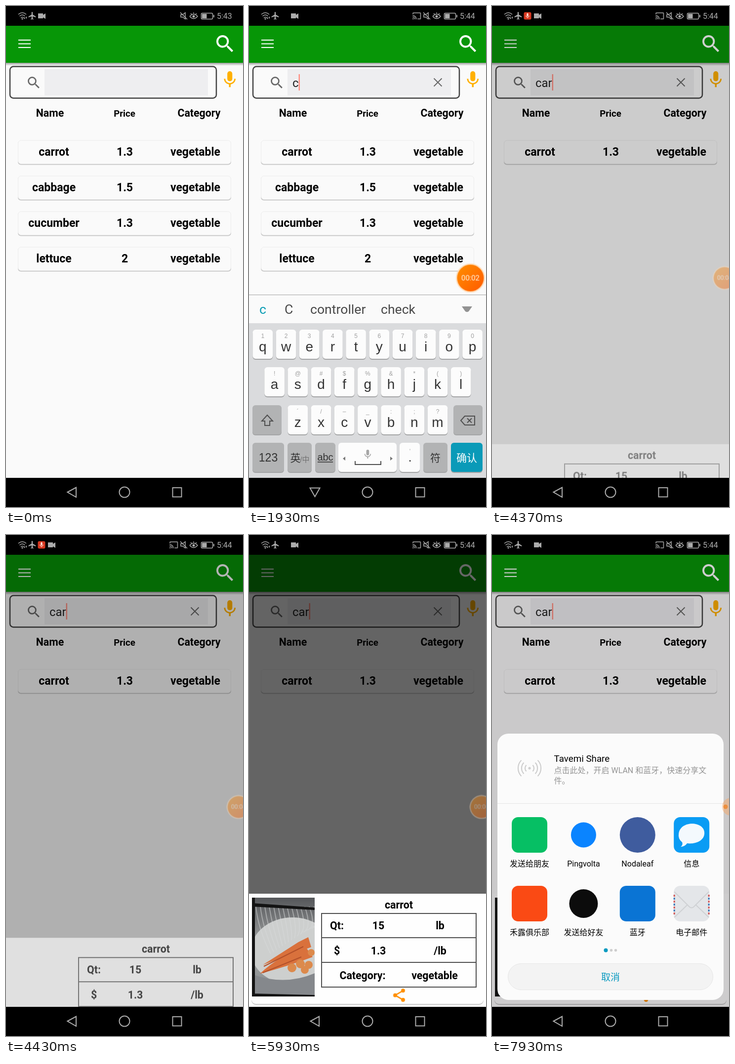
These frames come from a looping animation (480 px wide and 1014 px high, 8 s). An HTML page:

```html
<!DOCTYPE html>
<html lang="en">
<head>
<meta charset="utf-8">
<title>Grocery search</title>
<style>
html, body { margin: 0; width: 100%; height: 100%; overflow: hidden; background: #000; }
svg { display: block; width: 480px; height: 1014px; }
text { font-family: Roboto, 'Noto Sans CJK SC', 'Noto Sans CJK', sans-serif; }
.mid { text-anchor: middle; }
.bold { font-weight: 700; }
.line { fill: none; stroke-width: 2; }
.key { font-family: 'Liberation Sans', 'Noto Sans CJK SC', 'Noto Sans CJK', sans-serif; fill: #333; }
.hint { font-size: 12px; fill: #a0a0a0; }
.status { fill: #acacac; stroke: #acacac; stroke-width: 0; }
.status .line { fill: none; stroke-width: 1.5; }
.veil { mix-blend-mode: multiply; fill: #fff; }

#keyboard, #sheet, #photo, #share, #bubble, #under, #over { animation: 8s linear infinite; }
#keyboard { animation-name: keyboard; }
#sheet { animation-name: sheet; }
#photo { animation-name: photo; }
#share { animation-name: share; }
#bubble { animation-name: bubble; }
#under { animation-name: under; }
#over { animation-name: over; }

@keyframes keyboard {
  0%, 2.5% { transform: translateY(371px); animation-timing-function: cubic-bezier(.2, .6, .3, 1); }
  8.5%, 53.37% { transform: none; }
  53.375%, 100% { transform: translateY(371px); }
}
@keyframes sheet {
  0%, 54% { transform: translateY(229px); opacity: 0; }
  54.125% { transform: translateY(210px); opacity: .2; }
  55.375% { transform: translateY(90px); opacity: .62; animation-timing-function: ease-out; }
  57.875%, 100% { transform: none; opacity: 1; }
}
@keyframes photo {
  0%, 59.6% { opacity: 0; }
  62.9%, 100% { opacity: 1; }
}
@keyframes share {
  0%, 94.62% { transform: translateY(560px); }
  94.625% { transform: translateY(126px); animation-timing-function: cubic-bezier(.2, .6, .3, 1); }
  99.125%, 100% { transform: none; }
}
@keyframes bubble {
  0%, 31.6% { transform: translate(448.5px, 550.5px); opacity: 1; }
  33.75%, 100% { transform: translate(471px, 550.5px) scale(.82); opacity: .4; }
}
@keyframes under {
  0%, 53.375% { fill: #fff; }
  55.375% { fill: #b4b4b4; }
  57.875%, 94.62% { fill: #666; }
  94.625%, 100% { fill: #fff; }
}
@keyframes over {
  0%, 94.62% { fill: #fff; }
  94.625% { fill: #828284; }
  99.125%, 100% { fill: #cecdce; }
}
</style>
</head>
<body>
<svg viewBox="0 0 480 1014">
  <defs>
    <path id="lens" d="M15.5 14h-.79l-.28-.27A6.47 6.47 0 0 0 16 9.5 6.5 6.5 0 1 0 9.5 16c1.61 0 3.09-.59 4.23-1.57l.27.28v.79l5 4.99L20.49 19zm-6 0a4.5 4.5 0 1 1 0-9 4.5 4.5 0 0 1 0 9z"/>
    <path id="mic" d="M12 14a3 3 0 0 0 3-3V5a3 3 0 0 0-6 0v6a3 3 0 0 0 3 3zm5.3-3c0 3-2.54 5.1-5.3 5.1S6.7 14 6.7 11H5c0 3.41 2.72 6.23 6 6.72V21h2v-3.28c3.28-.48 6-3.3 6-6.72z"/>
    <linearGradient id="fade" x2="0" y2="1">
      <stop stop-color="#555"/><stop offset="1" stop-color="#555" stop-opacity="0"/>
    </linearGradient>
    <linearGradient id="wall" x2="0" y2="1">
      <stop stop-color="#55575a"/><stop offset=".5" stop-color="#a4a6a6"/><stop offset="1" stop-color="#85898c"/>
    </linearGradient>
    <linearGradient id="glow" x2="1" y2="1">
      <stop stop-color="#ff9000"/><stop offset="1" stop-color="#ff5a00"/>
    </linearGradient>
    <clipPath id="frame"><rect x="6" y="734" width="127" height="200"/></clipPath>
  </defs>

  <rect width="480" height="1014" fill="#fafafa"/>

  <!-- app bar and search box -->
  <rect y="115" width="480" height="6" fill="url(#fade)" opacity=".55"/>
  <rect y="40" width="480" height="75" fill="#079607"/>
  <path class="line" d="M25 69h25M25 76.5h25M25 84h25" stroke="#fff"/>
  <use href="#lens" transform="translate(420.2 53.2) scale(1.95)" fill="#fff"/>
  <rect x="8" y="122.5" width="418" height="64" rx="7" fill="#fafafa" stroke="#444" stroke-width="2.5"/>
  <rect x="78" y="128" width="331" height="53" fill="#eeeef0"/>
  <use href="#lens" transform="translate(40 139) scale(1.36)" fill="#686868"/>
  <use href="#mic" transform="translate(433 128.7) scale(1.69)" fill="#ffb000"/>
  <g id="field"></g>
  <path class="line" data-on="1370-8000" d="M374.5 146.5l16 16m0-16l-16 16" stroke="#686868"/>
  <g id="list"></g>

  <g id="keyboard">
    <rect y="584" width="480" height="371" fill="#fafafa"/>
    <rect y="584" width="480" height="1.2" fill="#b0b0b0"/>
    <rect y="642" width="480" height="313" fill="#dadbdd"/>
    <path d="M431 608h21l-7 10q-3.5 2.5-7 0z" fill="#929292"/>
    <g id="words"></g>
    <g id="keys"></g>
    <g class="line" stroke="#505050">
      <path d="M37 828l-11 12h6v9h10v-9h6z"/>
      <path d="M429 839l8-9h20v18h-20zM442 834.5l9 9m0-9l-9 9"/>
      <path d="M139 923h31M215 921v7h52v-7"/>
    </g>
    <path d="M195 912v8l-5-4zM286 912v8l5-4z" fill="#777"/>
    <use href="#mic" transform="translate(229 896) scale(.95)" fill="#a5a5a5"/>
  </g>

  <rect id="under" class="veil" y="40" width="480" height="915"/>

  <g id="sheet">
    <rect y="726" width="480" height="229" fill="#fefefe"/>
    <rect x="5" y="736" width="470" height="215" rx="9" fill="#cbcbcb"/>
    <rect x="5" y="734" width="470" height="215" rx="9" fill="#fefefe"/>
    <g id="photo" clip-path="url(#frame)">
      <rect x="6" y="734" width="127" height="200" fill="url(#wall)"/>
      <ellipse cx="88" cy="842" rx="84" ry="68" fill="#cdcfce"/>
      <g id="stripes" class="line" stroke="#d8dada" opacity=".5"></g>
      <path d="M6 889q66 24 127-2v47H6z" fill="#85888c"/>
      <path d="M22 888q40-38 93-54l14 20q-48 18-107 34zM28 870l72-46 20-10 6 20z" fill="#d9713c"/>
      <path d="M30 873l80-40M28 886l78-32" class="line" stroke="#b2502a"/>
      <g fill="#dc8a4c">
        <circle cx="87" cy="876" r="9"/><circle cx="104" cy="868" r="9"/><circle cx="121" cy="870" r="8"/>
        <circle cx="113" cy="880" r="8"/><circle cx="126" cy="845" r="7"/>
      </g>
      <path d="M6 745l127 9v5L6 752zM6 734h6v200H6zM6 928l127 3v3H6z" fill="#131313"/>
    </g>
    <path class="line" d="M147 766h313v149H147zM147 815h313M147 865h313" stroke="#505050"/>
    <g id="facts"></g>
    <g fill="#ff8f00" stroke="#ff8f00" transform="translate(288 915.5) scale(1.33)">
      <path class="line" d="M18 5L6 12l12 7"/>
      <circle cx="18" cy="5" r="2.5"/><circle cx="6" cy="12" r="2.5"/><circle cx="18" cy="19" r="2.5"/>
    </g>
  </g>

  <rect id="over" class="veil" y="40" width="480" height="915"/>

  <g id="share">
    <rect x="11" y="402" width="458" height="539" rx="22" fill="#fbfbfb"/>
    <rect x="11" y="543" width="458" height="1" fill="#e4e4e4"/>
    <rect x="32.5" y="867.5" width="415" height="53" rx="26.5" fill="#f3f3f3" stroke="#e6e6e6"/>
    <g id="waves" class="line" stroke="#cbcbcb"></g>
    <g id="apps"></g>
    <circle cx="230.5" cy="840.5" r="4" fill="#0a9ac0"/>
    <circle cx="241.5" cy="840.5" r="2.7" fill="#cecece"/>
    <circle cx="250.5" cy="840.5" r="2.7" fill="#cecece"/>
  </g>

  <!-- recorder bubble -->
  <g data-on="170-7270">
    <g id="bubble">
      <circle r="29.5" fill="#ffdcb8"/>
      <circle r="27" fill="url(#glow)"/>
    </g>
  </g>
  <g data-on="7270-8000">
    <circle cx="484" cy="550" r="18" fill="#ffa050" opacity=".4"/>
    <circle cx="473" cy="550" r="4.5" fill="#f08020" opacity=".75"/>
  </g>

  <!-- status bar -->
  <rect width="480" height="40"/>
  <g class="status">
    <path class="line" d="M25 17q8-7 16 0M27.5 20.5q5.5-5 11 0M30 24q3-3 6 0"/>
    <circle cx="33" cy="26" r="1.5"/>
    <path d="M36.5 27v-5l2.5 2.5zM42 21v5l-2.5-2.5z"/>
    <path transform="translate(44 10.4) scale(.78)" d="M21 16v-2l-8-5V3.5a1.5 1.5 0 0 0-3 0V9l-8 5v2l8-2.5V19l-2 1.5V22l3.5-1 3.5 1v-1.5L13 19v-5.5z"/>
    <path data-on="0-30" d="M65 15h10v3l5-3v11l-5-3v2H65z"/>
    <path data-on="30-8000" d="M85 15h10v3l5-3v11l-5-3v2H85z"/>
    <path data-on="30-8000" transform="translate(330.5 10.8) scale(.77)" d="M21 3H3a2 2 0 0 0-2 2v3h2V5h18v14h-7v2h7a2 2 0 0 0 2-2V5a2 2 0 0 0-2-2zM1 18v3h3a3 3 0 0 0-3-3zm0-4v2a5 5 0 0 1 5 5h2a7 7 0 0 0-7-7zm0-4v2a9 9 0 0 1 9 9h2A11 11 0 0 0 1 10z"/>
    <path class="line" d="M354 17.5h4l5-4v13l-5-4h-4zM353 13l14 14"/>
    <path class="line" d="M372 21q8-9 16 0q-8 9-16 0M374 15l2 2M380 13v2M386 15l-2 2"/>
    <circle cx="380" cy="21" r="2.5"/>
    <rect class="line" x="395.5" y="14.5" width="23" height="12" rx="2"/>
    <path d="M397 16h9.5v9H397zM420 18h1.8v5H420z"/>
  </g>
  <g data-on="30-1570 3100-4630 6200-7770">
    <rect x="64.5" y="12.5" width="15" height="15" rx="3" fill="#d83820"/>
    <use href="#mic" transform="translate(65.5 13.5) scale(.54)" fill="#ffe8e0"/>
  </g>
  <g id="clock"></g>

  <!-- navigation bar -->
  <rect y="955" width="480" height="59"/>
  <g class="line" stroke="#acacac">
    <path data-on="0-30 4270-8000" d="M124.5 984l17.5-9.5v19.5z"/>
    <path data-on="30-4270" d="M123.5 975.5h20l-10 17.5z"/>
    <circle cx="240" cy="984" r="10.5"/>
    <rect x="337.5" y="975" width="18" height="18.5"/>
  </g>
</svg>

<script>
const LOOP = 8000;
const add = (id, html) => document.getElementById(id).insertAdjacentHTML('beforeend', html);
const label = (x, y, size, str, cls = 'mid', extra = '') =>
  `<text x="${x}" y="${y}" font-size="${size}" class="${cls}" ${extra}>${str}</text>`;
const on = (...spans) => `data-on="${spans.join(' ')}"`;

// Product list
add('list', label(89, 224, 21.33, 'Name', 'mid bold') + label(240, 224, 18.67, 'Price', 'mid bold')
  + label(391, 224, 21.33, 'Category', 'mid bold'));
[['carrot', '1.3', 8000], ['cabbage', '1.5', 3250], ['cucumber', '1.3', 2200], ['lettuce', '2', 2200]]
  .forEach(([name, price, end], i) => {
    const y = 272 + 72 * i;
    const cells = [[97, name], [240.5, price], [383.5, 'vegetable']];
    add('list', `<g ${on('0-' + end)}>
      <rect x="24" y="${y + 1.5}" width="432" height="48" rx="6" fill="#c6c6c6"/>
      <rect x="24.5" y="${y}" width="431" height="47.5" rx="6" fill="#fafafa" stroke="#ececec"/>
      ${cells.map(([x, s]) => label(x, y + 31, 23, s, 'mid bold')).join('')}</g>`);
  });

// Typed text, caret and suggestions
const states = [
  { word: '', caret: 88, blink: ['30-1370'], span: '30-1370', tips: [] },
  { word: 'c', caret: 100.6, blink: ['1370-2070'], span: '1370-2070',
    tips: [[21, 'c'], [72, 'C'], [124, 'controller'], [267, 'check']] },
  { word: 'ca', caret: 113.6, blink: ['2070-2530', '3100-3130'], span: '2070-3130',
    tips: [[21, 'ca'], [87, 'can'], [167, 'call'], [242, 'car']] },
  { word: 'car', caret: 121.6, blink: ['3130-3730', '4270-8000'], span: '3130-8000',
    tips: [[21, 'car'], [96, 'carry'], [189, 'care'], [271, 'card']] },
];
for (const { word, caret, blink, span, tips } of states) {
  add('field', label(88, 164, 24, word, '', `fill="#202020" ${on(span)}`)
    + `<rect x="${caret}" y="138" width="2.4" height="33" fill="#ff8c80" ${on(...blink)}/>`);
  add('words', `<g ${on(span)}>` + tips.map(([x, s], i) =>
    label(x, 622.5, 26.6, s, '', `fill="${i ? '#484848' : '#0a9cb4'}"`)).join('') + '</g>');
}

// Keyboard
const cap = (x, y, w, fill = '#fcfcfc') => `
  <rect x="${x}" y="${y + 2}" width="${w}" height="59" rx="6" fill="#a4a5a6"/>
  <rect x="${x}" y="${y}" width="${w}" height="59" rx="6" fill="${fill}"/>`;
const presses = { c: '1300-1430', a: '2000-2130', r: '3100-3230' };
[['qwertyuiop', '1234567890', 7.5, 655], ['asdfghjkl', '!@#$%&*()', 31.3, 731], ['zxcvbnm', '´/–_:;?', 78.5, 808]]
  .forEach(([letters, hints, x0, y]) => [...letters].forEach((ch, i) => {
    const x = x0 + 47.2 * i, cx = x + 20.3;
    const press = presses[ch]
      ? `<rect x="${x}" y="${y}" width="40.6" height="59" rx="6" fill="#c4c4c4" ${on(presses[ch])}/>` : '';
    add('keys', cap(x, y, 40.6) + press + label(cx, y + 17, 12, hints[i].replace('&', '&amp;'), 'mid key hint')
      + label(cx, y + 44, 28, ch, 'mid key'));
  }));
const grey = '#b2b3b4';
add('keys', cap(7, 808, 59, grey) + cap(414, 808, 59, grey) + cap(7, 884, 64, grey) + cap(78, 884, 49, grey)
  + cap(134, 884, 41, grey) + cap(181, 884, 118) + cap(305, 884, 41) + cap(353, 884, 49, grey)
  + cap(409, 884, 64, '#0a9ab8')
  + label(39, 922, 23, '123', 'mid key') + label(94, 922, 21, '英', 'mid key')
  + label(113, 923, 15, '/中', 'mid key', 'opacity=".5"') + label(154.5, 920, 20, 'abc', 'mid key')
  + label(326, 922, 26, '.', 'mid key') + label(326, 898, 14, ',', 'mid key hint')
  + label(377.5, 922, 21, '符', 'mid key')
  + label(441, 922, 21, '确认', 'mid', 'fill="#fff"'));

// Product sheet
for (let i = 0; i < 16; i++)
  add('stripes', `<path d="M${14 + i * 9} 752q${4 + i} 44 ${30 - i * 3} ${96 - i * 4}"/>`);
[[303.5, 756, 'carrot'], [178, 798, 'Qt:'], [262, 798, '15'], [387, 798, 'lb'], [178, 849, '$'],
 [262, 849, '1.3'], [387, 849, '/lb'], [230, 899, 'Category:'], [376, 899, 'vegetable']]
  .forEach(([x, y, s]) => add('facts', label(x, y, 21.33, s, 'mid bold')));

// Share panel
add('waves', '<circle cx="76" cy="472" r="1.5"/>');
for (const r of [9, 16, 23]) {
  const dx = r * .72, dy = r * .7;
  for (const s of [-1, 1])
    add('waves', `<path d="M${76 + s * dx} ${472 - dy}A${r} ${r} 0 0 ${s > 0 ? 1 : 0} ${76 + s * dx} ${472 + dy}"/>`);
}
add('apps', label(125.5, 458.5, 18.8, 'Tavemi Share', '')
  + label(125.5, 481.5, 16, '点击此处，开启 WLAN 和蓝牙，快速分享文', '', 'fill="#949494"')
  + label(125.5, 502.5, 16, '件。', '', 'fill="#949494"')
  + label(240, 901.5, 19, '取消', 'mid', 'fill="#0a9ac0"'));
const tile = fill => `<rect x="-36" y="-36" width="72" height="72" rx="13" fill="${fill}"/>`;
const disc = (r, fill) => `<circle r="${r}" fill="${fill}"/>`;
const chat = tile('#0a9cf4') + '<path d="M-19 15Q-28 8-26-3C-22-30 26-28 26-4C26 14 4 19-9 17Q-14 24-22 24Q-17 20-19 15z" fill="#f4f9fd"/>';
const mail = tile('#e4e6e9') + `<path class="line" d="M-35-24L-4 7Q0 10 4 7L35-24M-35 28L-9 3M35 28L9 3" stroke="#cfd1d4"/>
  <path d="M-35-18V24M35-18V24" stroke="#d05858" stroke-width="3" stroke-dasharray="4 8"/>
  <path d="M-35-12V24M35-12V24" stroke="#3a78b8" stroke-width="3" stroke-dasharray="4 8"/>`;
[['发送给朋友', tile('#06bf64')], ['Pingvolta', disc(25.5, '#0a84ff')], ['Nodaleaf', disc(36, '#3f5c9e')], ['信息', chat],
 ['禾露俱乐部', tile('#fa4a14')], ['发送给好友', disc(29, '#0c0c0c')], ['蓝牙', tile('#0a74d4')], ['电子邮件', mail]]
  .forEach(([name, icon], i) => {
    const x = 76 + 109.4 * (i % 4), y = i < 4 ? 607 : 746;
    add('apps', `<g transform="translate(${x} ${y})">${icon}</g>` + label(x, y + 63.5, 16, name));
  });

// Clock and recorder counter
add('clock', label(427, 26, 16, '5:43', '', `fill="#acacac" ${on('0-430')}`)
  + label(427, 26, 16, '5:44', '', `fill="#acacac" ${on('430-8000')}`));
for (let s = 0; s < 9; s++) {
  const from = Math.max(0, s * 1000 - 70), to = Math.min(LOOP, s * 1000 + 930);
  add('bubble', label(0, 5, 14.8, `00:0${s}`, 'mid', `fill="#fff8ec" ${on(`${from}-${to}`)}`));
}

// Hard on/off switches
for (const el of document.querySelectorAll('[data-on]')) {
  const steps = [{ offset: 0, opacity: 0 }];
  for (const span of el.dataset.on.split(' ')) {
    const [from, to] = span.split('-').map(Number);
    steps.push({ offset: from / LOOP, opacity: 1 }, { offset: to / LOOP, opacity: 0 });
  }
  if (steps.at(-1).offset < 1) steps.push({ offset: 1, opacity: 0 });
  el.animate(steps.map(k => ({ ...k, easing: 'step-end' })), { duration: LOOP, iterations: Infinity });
}

// One shared start for every animation
const start = document.timeline.currentTime ?? 0;
for (const a of document.getAnimations()) a.startTime = start;
</script>
</body>
</html>
```
